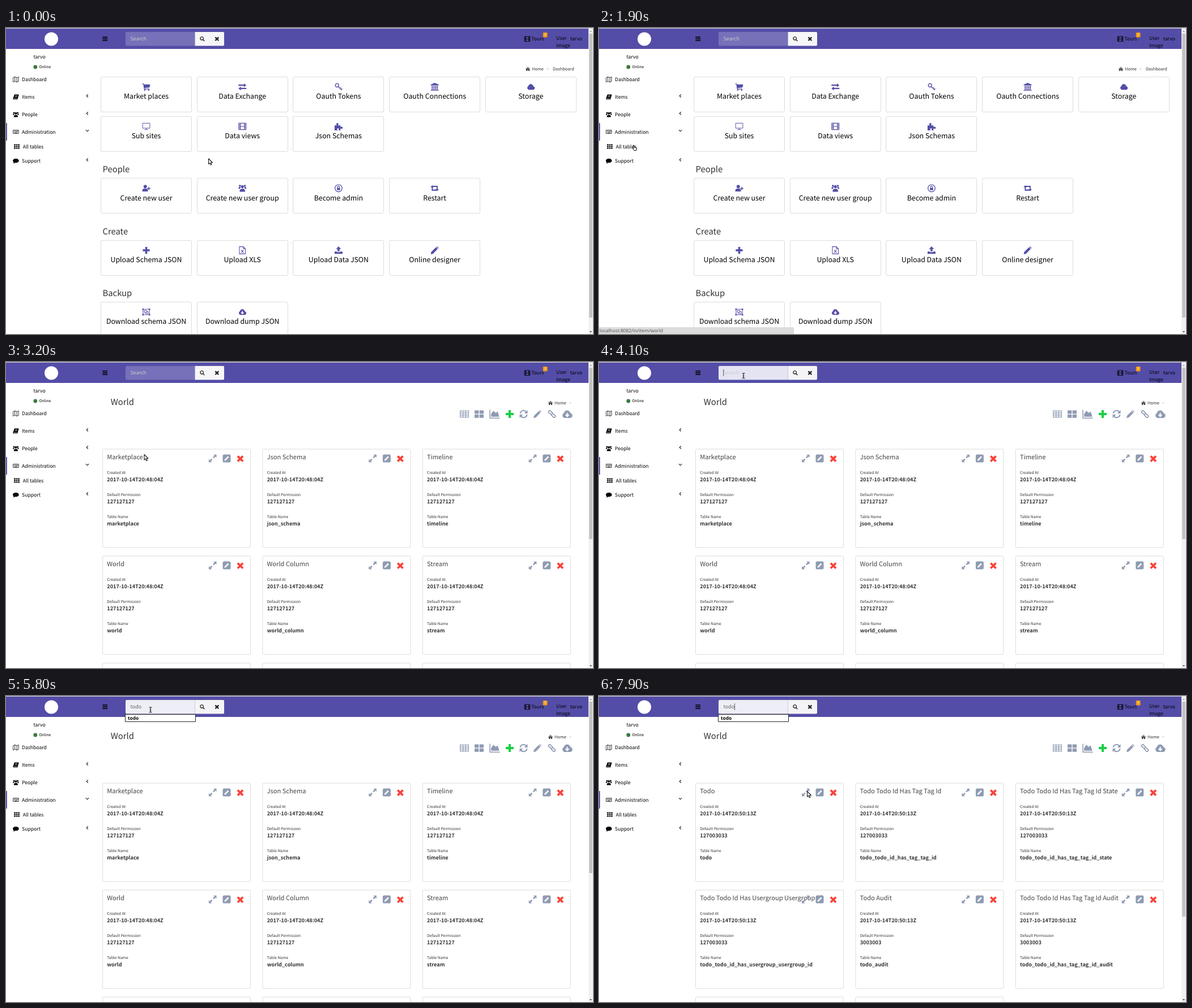
Write an HTML page with a canvas that moves like this. It is 1036x541 px and loops after 8 s.

```html
<!DOCTYPE html>
<html lang="en">
<head>
<meta charset="utf-8">
<title>Admin dashboard</title>
<style>
html, body { margin: 0; width: 100%; height: 100%; overflow: hidden; background: #fff; }
canvas { display: block; }
</style>
</head>
<body>
<canvas id="stage" width="1036" height="541"></canvas>
<script>
const ctx = document.getElementById('stage').getContext('2d');
const LOOP = 8000, STEP = 100;
const PURPLE = '#544da7', SLATE = '#8f9bb3', RED = '#fb4238', USER = 'tarvo';
const SANS = '"Noto Sans CJK JP","Noto Sans CJK SC","Noto Sans CJK",sans-serif';
const UI = '"Noto Sans","Open Sans",sans-serif';
const ZOOM = 0.6175; // page zoom, corrected for the wider face

// Icons on a 16-unit grid: fill, stroke, line width, white cut, cut width
const CLOUD = 'M4 14a4 4 0 0 1-1-7.5A4.8 4.8 0 0 1 12 5a3.5 3.5 0 0 1 1.5 2A3.6 3.6 0 0 1 12.5 14z';
const ICONS = {
  cart: ['M0 1h3l.5 2H16l-1.5 6.5-10 1 .5 1.2h9.5V13H3.6L2 2.5H0zM5 13a1.5 1.5 0 1 0 .01 0zM13 13a1.5 1.5 0 1 0 .01 0z'],
  exchange: ['M0 3.5h11V1l5 3.8-5 3.7V6H0zM16 10H5V7.5L0 11.3 5 15v-2.5h11z'],
  key: ['', 'M5 1.5a3.5 3.5 0 1 1-.01 0zM7.6 7.6L14.6 14.6M11 11l2-2M13.4 13.4l2-2', 1.6],
  bank: ['M8 0l8 3.5V5H0V3.5zM2 6h2v6H2zM5.5 6h2v6h-2zM9 6h2v6H9zM12.3 6h2v6h-2zM1 12.6h14v1.2H1zM0 14.5h16V16H0z'],
  cloud: [CLOUD],
  desktop: ['', 'M.7 1.5h14.6v10H.7zM8 11.5v3M4.5 14.5h7', 1.1],
  film: ['', 'M.8 1.5h14.4v13H.8zM4 1.5v13M12 1.5v13M4 8h8M1 5h3M1 8h3M1 11h3M12 5h3M12 8h3M12 11h3', 1.4],
  puzzle: ['M0 6h4.5c-.3-1-1-1.5-1-2.7a2.2 2.2 0 0 1 4.4 0c0 1.2-.8 1.7-.9 2.7H12v3.5c1 0 1.4-.8 2.4-.8a2 2 0 0 1 0 4.2c-1 0-1.5-.8-2.4-.8V16H8c0-1.2.7-1.4.7-2.4a1.8 1.8 0 0 0-3.6 0c0 1 .8 1.2.8 2.4H0z'],
  userPlus: ['M6 1a3.5 3.5 0 1 1-.01 0zM0 14.5c0-4.5 1.5-6 6-6s5.5 1.5 5.5 6zM12.3 5.5h1.8v2.2h2.2v1.8h-2.2v2.2h-1.8V9.5h-2.2V7.7h2.2z'],
  users: ['M8 2a3 3 0 1 1-.01 0zM2.5 15c0-5 2-6 5.5-6s5.5 1 5.5 6zM3 1a2 2 0 1 1-.01 0zM13 1a2 2 0 1 1-.01 0zM0 9c0-2.5 1-3.5 3-3.5l1.5.5L3 9zM16 9c0-2.5-1-3.5-3-3.5L11.5 6 13 9z'],
  lock: ['M4.8 7.2h6.4v4.6H4.8z', 'M8 .8a7.2 7.2 0 1 1-.01 0zM6 7V5.8a2 2 0 0 1 4 0V7', 1.3],
  retweet: ['M3 2l3.5 4H4.2v4.5H10l2 2.5H2V6H-.5zM13 14l-3.5-4h2.3V5.500H6L4 3h10v7h2.500z'],
  plus: ['M6 1h4v5h5v4h-5v5H6v-5H1V6h5z'],
  sheet: ['', 'M2 .7h8l4 4v10.600H2zM10 .7v4h4M5.5 7l5 6M10.5 7l-5 6', 1.2],
  upload: ['M8 0l5 5.5h-3V10H6V5.500H3zM0 10.500h4.800v1.200h6.400v-1.200H16V15H0z'],
  pencil: ['M0 16l1-4.500L10.500 2 14 5.500 4.500 15zM11.300 1.200L12.500 0 16 3.500l-1.200 1.200z'],
  group: ['M0 1h3v3H0zM13 1h3v3h-3zM0 12h3v3H0zM13 12h3v3h-3z', 'M1.5 2.500h13v11h-13zM4 5h5v4H4zM7 9v2.500h5V7H9', 1.1],
  download: [CLOUD, '', 0, 'M8 6v5.500M5.500 9L8 11.700 10.500 9', 1.7],
  table: ['', 'M.7 2h14.600v12H.7zM.7 5h14.600M.7 8h14.600M.7 11h14.600M5.600 3v11M10.400 3v11', 1.2],
  large: ['M0 1.500h7.300v6H0zM8.700 1.500H16v6H8.700zM0 8.800h7.300v6H0zM8.700 8.800H16v6H8.700z'],
  area: ['M2.500 12V8L6 3l3.500 3.200L12.500 4 15 12z', 'M.7 1.500v12.800H16', 1.3],
  refresh: ['M15 1v6H9zM1 15V9h6z', 'M2 7a6 6 0 0 1 10.500-3M14 9a6 6 0 0 1-10.500 3', 2],
  link: ['', 'M8.500 9.500L7 9 2.300 5.500a2.300 2.300 0 0 1 3.200-3.200L9 6v2M7.500 6.500L9 7l4.700 3.500a2.300 2.300 0 0 1-3.200 3.200L7 10V8', 1.7],
  expand: ['M9.500 .5h6v6l-2-2-3.200 3.200-2-2 3.200-3.200zM6.500 15.500h-6v-6l2 2 3.200-3.200 2 2-3.200 3.200z'],
  edit: ['M3 0h10a3 3 0 0 1 3 3v10a3 3 0 0 1-3 3H3a3 3 0 0 1-3-3V3a3 3 0 0 1 3-3z', '', 0, 'M4 12l7.500-7.500', 3],
  cross: ['', 'M2.500 2.500l11 11M13.500 2.500l-11 11', 4.4],
  home: ['M8 1l8 7-1 1-7-6-7 6-1-1zM2.500 9L8 4.500 13.500 9v5.500h-4v-4h-3v4h-4z'],
  search: ['', 'M6.500 1.500a5 5 0 1 1-.01 0zM10.500 10.500L15 15', 2.3],
  map: ['', 'M.7 3l4.500-2 5.500 2 4.600-2v12l-4.600 2-5.500-2-4.500 2zM5.200 1v12M10.700 3v12', 1.2],
  book: ['M4 1h12l-3.500 13.500h-11C0 14 0 12 .8 11z', '', 0, 'M6 4.500h6M5.400 7h6M2 12.200h9.500', 1],
  keyboard: ['', 'M.7 3.500h14.600v9H.7zM3 6h2M6 6h2M9 6h2M12 6h2M3 8.200h2M6 8.200h2M9 8.200h4M4.500 10.500h7', 1.2],
  grid: ['', 'M0 3.200h16M0 8h16M0 12.800h16', 3.4, 'M5.200 0v16M10.800 0v16', 1.2],
  comment: ['M8 2c4.500 0 8 2.300 8 5.500S12.500 13 8 13c-1 0-1.600 0-2.400-.2C4 14 2.500 14.600 1 14.800c1-1 1.300-1.800 1.300-2.900C.8 10.800 0 9.300 0 7.500 0 4.300 3.500 2 8 2z']
};
for (const k in ICONS) {
  const [f, s, w, c, cw] = ICONS[k];
  ICONS[k] = { fill: f && new Path2D(f), line: s && new Path2D(s), w, cut: c && new Path2D(c), cw };
}

const POINTERS = {
  arrow: new Path2D('M0 0v9.600l2.200-2 1.500 3.500 1.700-.7-1.500-3.400h3z'),
  hand: new Path2D('M1.200 .3c.8 0 1 .6 1 1.200V4l3.200.6c1 .2 1.200.9 1 1.700L5.800 9.500H2.400L-.5 6c.2-.9 1-.8 1.300-.2L.4 1.500C.3.7.6.3 1.200.3z'),
  beam: new Path2D('M-2.500 .8c1.500 0 2.500.3 2.500 1.200 0-.9 1-1.200 2.500-1.200M0 2v6.500M-2.500 9.700c1.500 0 2.500-.3 2.500-1.200 0 .9 1 1.200 2.500 1.200M-1.300 5.800h2.600')
};

// Pointer route: time, x, y
const ROUTE = [
  [0, 357.5, 231], [300, 357.5, 231], [400, 354, 230.5], [500, 354, 230.5],
  [600, 335, 231], [800, 241, 232], [1000, 241, 232], [1100, 150, 235],
  [1200, 92, 237], [1300, 92, 237], [1900, 60, 207], [2700, 60, 207],
  [2800, 72, 204], [3000, 165, 181], [3200, 244, 163.5], [3300, 258, 147],
  [3400, 258, 147], [3500, 259, 133], [3700, 257, 50], [3800, 255, 19],
  [6500, 255, 19], [6600, 262, 45], [6800, 303, 140], [7000, 321, 189],
  [7400, 321, 189], [7700, 342, 172], [7800, 342, 172], [7900, 367.5, 168.5]
];

const TILES = [
  [86, '', 'Market places:cart', 'Data Exchange:exchange', 'Oauth Tokens:key', 'Oauth Connections:bank', 'Storage:cloud'],
  [156, '', 'Sub sites:desktop', 'Data views:film', 'Json Schemas:puzzle'],
  [265.3, 'People', 'Create new user:userPlus', 'Create new user group:users', 'Become admin:lock', 'Restart:retweet'],
  [375, 'Create', 'Upload Schema JSON:plus', 'Upload XLS:sheet', 'Upload Data JSON:upload', 'Online designer:pencil'],
  [484, 'Backup', 'Download schema JSON:group', 'Download dump JSON:download']
];
const MENU = [
  ['Dashboard', 'map', 91], ['Items', 'book', 122, 'left'], ['People', 'users', 153, 'left'],
  ['Administration', 'keyboard', 183.5, 'down'], ['All tables', 'grid', 209.5], ['Support', 'comment', 235, 'left']
];
const FIRST = ['Marketplace', 'Json Schema', 'Timeline', 'World', 'World Column', 'Stream']
  .map(n => [n, '127127127']);
const FOUND = [
  ['Todo', '127003033'], ['Todo Todo Id Has Tag Tag Id', '127003033'], ['Todo Todo Id Has Tag Tag Id State', '127003033'],
  ['Todo Todo Id Has Usergroup Usergroup Id', '127003033'], ['Todo Audit', '3003003'], ['Todo Todo Id Has Tag Tag Id Audit', '3003003']
];

function rect(x, y, w, h, color) {
  ctx.fillStyle = color;
  ctx.fillRect(x, y, w, h);
}

function round(x, y, w, h, r, fill, line) {
  ctx.beginPath();
  ctx.roundRect(x, y, w, h, r);
  if (fill) { ctx.fillStyle = fill; ctx.fill(); }
  if (line) { ctx.strokeStyle = line; ctx.lineWidth = 1; ctx.stroke(); }
}

function write(str, x, y, font, color, align = 'left') {
  ctx.font = font;
  ctx.textRendering = 'geometricPrecision';
  ctx.fillStyle = color;
  ctx.textAlign = align;
  ctx.fillText(str, x, y);
}

// Page text, vertically centred on its capitals
function text(str, x, mid, px, color = '#000', align, weight = 400) {
  const size = px * ZOOM;
  write(str, x, mid + size * 0.3665, `${weight} ${size}px ${SANS}`, color, align);
}

function icon(name, cx, cy, size, color = '#000') {
  const { fill, line, w, cut, cw } = ICONS[name];
  ctx.save();
  ctx.translate(cx - size / 2, cy - size / 2);
  ctx.scale(size / 16, size / 16);
  ctx.fillStyle = ctx.strokeStyle = color;
  if (fill) ctx.fill(fill);
  if (line) { ctx.lineWidth = w; ctx.stroke(line); }
  if (cut) { ctx.strokeStyle = '#fff'; ctx.lineWidth = cw; ctx.stroke(cut); }
  ctx.restore();
}

function chevron(x, y, dir) {
  ctx.save();
  ctx.translate(x, y);
  if (dir === 'down') ctx.rotate(-Math.PI / 2);
  ctx.strokeStyle = '#111';
  ctx.lineWidth = 1.1;
  ctx.beginPath();
  ctx.moveTo(1.3, -2.6);
  ctx.lineTo(-1.3, 0);
  ctx.lineTo(1.3, 2.6);
  ctx.stroke();
  ctx.restore();
}

function triangle(x, y, dy, color) {
  ctx.fillStyle = color;
  ctx.beginPath();
  ctx.moveTo(x - 2.2, y);
  ctx.lineTo(x + 2.2, y);
  ctx.lineTo(x, y + dy);
  ctx.fill();
}

function disc(x, y, r, color) {
  ctx.fillStyle = color;
  ctx.beginPath();
  ctx.arc(x, y, r, 0, 7);
  ctx.fill();
}

function pointerAt(t) {
  let i = ROUTE.length - 1;
  while (ROUTE[i][0] > t) i--;
  const [t0, x0, y0] = ROUTE[i], [t1, x1, y1] = ROUTE[i + 1] || [LOOP, x0, y0];
  const k = (t - t0) / (t1 - t0);
  return [x0 + (x1 - x0) * k, y0 + (y1 - y0) * k];
}

function drawHeader(t) {
  rect(0, 0, 1036, 1, '#dfdcda');
  rect(0, 1, 1028, 36, PURPLE);
  disc(80, 19.5, 12, '#fff');
  for (let i = 0; i < 3; i++) rect(170.3, 15.3 + i * 3, 8.8, 1.6, '#000');

  const focus = t >= 4100;
  const glow = !focus ? 0.2 : t < 4200 ? 0.85 : t < 4300 ? 0.88 : 0.9;
  round(211, 7, 122.500, 24.500, [2, 0, 0, 2], `rgba(255,255,255,${glow})`);
  round(333.5, 7, 51.500, 24.500, [0, 2, 2, 0], focus ? '#f4f4f6' : '#f6f6f8');
  icon('search', 346.5, 19.3, 9, '#222');
  icon('cross', 372.3, 19.3, 8.5, '#222');

  const typed = 'todo'.slice(0, t < 4700 ? 0 : t < 4900 ? 1 : t < 5100 ? 2 : t < 5200 ? 3 : 4);
  text(typed || 'Search', 219.5, 19.200, 14.5, typed ? '#666' : '#ccc');
  const blink = t < 5200 || Math.floor((t - 5200) / 600) % 2 === 0;
  if (focus && blink) {
    const w = typed ? ctx.measureText(typed).width : 0;
    rect(219.3 + w, 13, 0.9, 12, '#444');
  }

  icon('film', 920, 19.3, 10.5);
  text('Tours', 927.3, 19.300, 14);
  round(947.7, 8, 7.8, 8.5, 1.5, '#f39c12');
  text('?', 951.6, 12.3, 9, '#fff', 'center', 700);
  text('User', 971, 17.5, 14);
  text('Image', 971, 31.3, 14);
  text(USER, 995.7, 19.3, 14);
}

function drawSidebar(px, py) {
  text(USER, 48.5, 51.3, 14);
  disc(51.8, 69, 3.4, '#3c7a3d');
  text('Online', 58.500, 69, 11);
  rect(0, 168, 1.8, 31, PURPLE);
  if (px < 154 && py > 220) rect(0, 220, 1.8, 31, PURPLE);
  for (const [label, name, y, dir] of MENU) {
    const sub = name === 'grid';
    icon(name, sub ? 19 : 17.4, y, sub ? 10 : 10.5);
    text(label, sub ? 29.800 : 28, y, 14);
    if (dir) chevron(143.5, y - 2, dir);
  }
}

function drawCrumbs(x, page) {
  icon('home', x + 4, 72.5, 8.500, '#333');
  text('Home', x + 11, 72.5, 12, '#333');
  text('>', x + 37, 72.500, 12, '#bbb');
  if (page) text(page, x + 48, 72.5, 12, '#333');
}

function drawDashboard() {
  drawCrumbs(917, 'Dashboard');
  for (const [y, heading, ...tiles] of TILES) {
    if (heading) text(heading, 170.500, y - 15.5, 24, '#333');
    tiles.forEach((tile, i) => {
      const [label, name] = tile.split(':'), cx = 247.500 + i * 169.700;
      round(Math.round(cx - 80.500) + 0.5, Math.round(y) + 0.5, 160, 62, 2.5, '#fff', '#dcdcdc');
      icon(name, cx, y + 18, 14, PURPLE);
      text(label, cx, y + 34.7, 20, '#000', 'center');
    });
  }
}

function drawCard(x, y, item, date) {
  round(x, y, 261, 174, 2, '#fff', '#dcdcdc');
  if (item) {
    const [title, permission] = item;
    text(title, x + 7.700, y + 14.2, 18, '#444');
    const rows = [['Created At', date], ['Default Permission', permission],
      ['Table Name', title.toLowerCase().replace(/ /g, '_')]];
    rows.forEach(([label, value], i) => {
      text(label, x + 7.800, y + 41.5 + i * 39, 11, '#333');
      text(value, x + 7.800, y + 54 + i * 39, 14.8, '#333', 'left', 700);
    });
  }
  icon('expand', x + 194.2, y + 16.5, 14.5, SLATE);
  icon('edit', x + 219, y + 16.500, 14, SLATE);
  icon('cross', x + 243, y + 17, 13.5, RED);
}

function drawWorld(t) {
  const found = t >= 6200;
  drawCrumbs(957);
  text('World', 184.800, 71, 24, '#333');
  const tools = [['table', 809], ['large', 835], ['area', 862.5], ['plus', 889], ['refresh', 913.5],
    ['pencil', 938], ['link', 963.5], ['download', 990.5]];
  for (const [name, x] of tools) {
    const size = name === 'area' || name === 'download' ? 18.5 : name === 'pencil' ? 14 : 16;
    icon(name, x, 92, size, name === 'plus' ? '#19cf43' : SLATE);
  }
  const items = found ? FOUND : FIRST, date = `2017-10-14T20:${found ? '50:13' : '48:04'}Z`;
  for (let i = 0; i < (found ? 8 : 9); i++)
    drawCard(170.5 + (i % 3) * 282.400, 154 + Math.floor(i / 3) * 189.100, items[i], date);
}

function drawSuggestions(t) {
  if (t < 4800) return;
  const list = t < 4900 ? ['timeline', 'tag', 'todo', 'team', 'template'] : ['todo'];
  round(210.5, 32.5, 124, list.length * 13.4 - 0.5, 0, '#fff', '#222');
  list.forEach((s, i) => write(s, 215, 41.7 + i * 13.4, `700 8.28px ${UI}`, '#000'));
}

function drawScrollbar(t) {
  rect(1028, 1, 8, 540, '#f1f1f1');
  rect(1029.3, 10, 5.6, (t < 2600 ? 512 : t < 6200 ? 313 : 390) - 10, '#c1c1c1');
  triangle(1032, 7, -2.6, '#a3a3a3');
  triangle(1032, 536, 2.6, '#505050');
}

function drawLoading(t) {
  if (t < 2600 || t >= 2900) return;
  const k = (t - 2600) / 100;
  round(-3, 0.5, 58 + k * 320, 2.5, 1.2, '#fff');
  ctx.strokeStyle = '#fff';
  ctx.lineWidth = 1.8;
  ctx.beginPath();
  ctx.arc(509, 17.500, 5, Math.PI * 1.08 + k * 1.6, Math.PI * 1.92 + k * 1.6);
  ctx.stroke();
}

function drawPointer(x, y) {
  const kind = y < 32 ? 'beam' : x < 154 && y > 200 ? 'hand' : 'arrow';
  ctx.save();
  ctx.translate(x, y);
  ctx.lineJoin = 'round';
  ctx.strokeStyle = '#1a1a1a';
  ctx.lineWidth = 1.1;
  if (kind !== 'beam') {
    ctx.fillStyle = '#fff';
    ctx.fill(POINTERS[kind]);
  }
  ctx.stroke(POINTERS[kind]);
  ctx.restore();
}

function draw(now) {
  const t = Math.floor((now % LOOP) / STEP) * STEP;
  const [px, py] = pointerAt(t);
  rect(0, 0, 1036, 541, '#fff');
  if (t < 2600) drawDashboard();
  else drawWorld(t);
  drawSidebar(px, py);
  drawHeader(t);
  drawSuggestions(t);
  drawScrollbar(t);
  drawLoading(t);
  if (t >= 1700 && t < 2800) {
    round(-1, 529, 345, 13, [0, 3, 0, 0], '#dcdcdc');
    write('localhost:8082/in/item/world', 1, 538, `8.28px ${UI}`, '#555');
  }
  drawPointer(px, py);
}

const start = performance.now();
function tick() {
  draw(performance.now() - start);
  requestAnimationFrame(tick);
}
tick();
</script>
</body>
</html>
```
